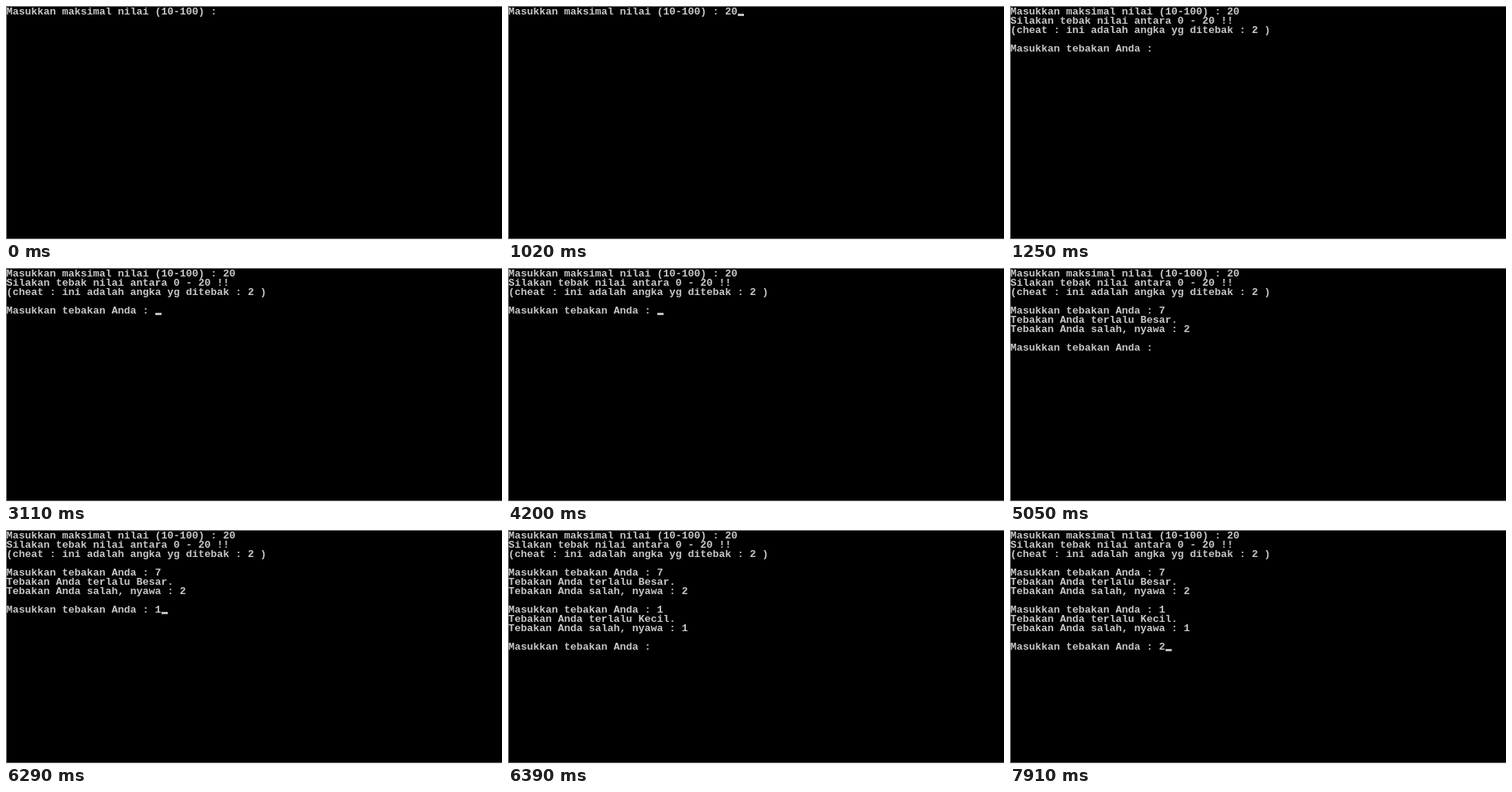
Animation of 641x303 px, one loop 8000 ms. Source, as an HTML page:

```html
<!DOCTYPE html>
<html lang="id">
<head>
<meta charset="utf-8">
<title>Tebak angka</title>
<style>
html, body { margin: 0; width: 100%; height: 100%; overflow: hidden; background: #000; }
svg { display: block; width: 100%; height: 100%; }
text { font: bold 13.33px "Liberation Mono", "DejaVu Sans Mono", monospace; fill: #c8c8c8; white-space: pre; }
</style>
</head>
<body>
<svg viewBox="0 0 641 303" xmlns="http://www.w3.org/2000/svg">
  <rect width="641" height="303" fill="#000"/>
  <path d="M0 0H641V1H1V301H641V302H0Z" fill="#808080" shape-rendering="crispEdges"/>
  <rect y="302" width="641" height="1" fill="#fff" shape-rendering="crispEdges"/>
  <g id="screen"></g>
  <rect id="cursor" width="8" height="3" fill="#c0c0c0" shape-rendering="crispEdges"/>
</svg>
<script>
const LOOP = 8000, CELL_W = 8, CELL_H = 12, ROWS = 13;
const ASK = 'Masukkan tebakan Anda : ';
const start = 'Masukkan maksimal nilai (10-100) : ';
const round1 = start + '20\nSilakan tebak nilai antara 0 - 20 !!\n' +
  '(cheat : ini adalah angka yg ditebak : 2 )\n\n' + ASK;
const reply = (guess, hint, lives) =>
  `${guess}\nTebakan Anda terlalu ${hint}.\nTebakan Anda salah, nyawa : ${lives}\n\n${ASK}`;
const round2 = round1 + reply(7, 'Besar', 2);
const round3 = round2 + reply(1, 'Kecil', 1);

// [time in ms, console content, cursor visible]
const steps = [
  [0, start, 0], [70, start, 1], [480, start + '2', 1], [640, start + '20', 0], [1020, start + '20', 1],
  [1250, round1, 0], [2120, round1, 1], [2650, round1, 0], [3110, round1, 1],
  [3660, round1, 0], [4200, round1, 1], [4670, round1 + '7', 0], [4750, round1 + '7', 1],
  [5050, round2, 0], [5740, round2, 1], [5980, round2 + '1', 0], [6290, round2 + '1', 1],
  [6390, round3, 0], [7380, round3, 1], [7530, round3 + '2', 0], [7910, round3 + '2', 1]
];

const screen = document.getElementById('screen');
const cursor = document.getElementById('cursor');
const rows = Array.from({ length: ROWS }, (_, i) => {
  const row = document.createElementNS('http://www.w3.org/2000/svg', 'text');
  row.setAttribute('x', 0.5);
  row.setAttribute('y', 11 + i * CELL_H);
  return screen.appendChild(row);
});

let shown;
function draw(ms) {
  const step = steps.findLast(s => s[0] <= ms % LOOP);
  if (step === shown) return;
  shown = step;
  const lines = step[1].split('\n'), last = lines.length - 1;
  rows.forEach((row, i) => { row.textContent = lines[i] || ''; });
  cursor.setAttribute('x', 1 + lines[last].length * CELL_W);
  cursor.setAttribute('y', 10 + last * CELL_H);
  cursor.setAttribute('visibility', step[2] ? 'visible' : 'hidden');
}

const t0 = performance.now();
function tick() {
  draw(performance.now() - t0);
  requestAnimationFrame(tick);
}
tick();
</script>
</body>
</html>
```
